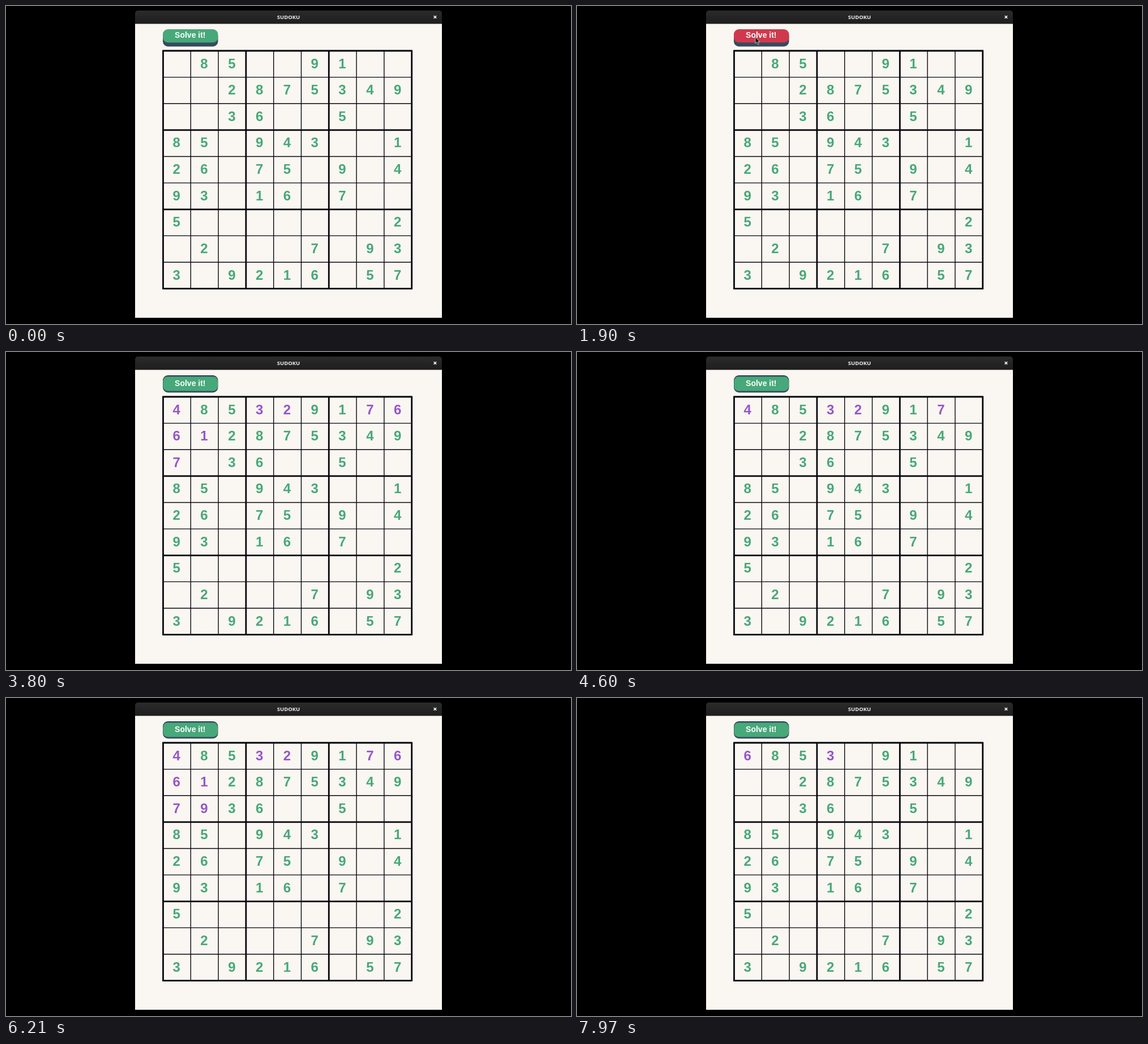
An HTML page with a canvas for the animation above (8 s loop, 998 by 561 pixels).

```html
<!DOCTYPE html>
<html lang="en">
<head>
<meta charset="utf-8">
<title>Sudoku solver</title>
<style>
  html, body { margin: 0; width: 100%; height: 100%; overflow: hidden; background: #000; }
  canvas { display: block; }
</style>
</head>
<body>
<canvas id="stage" width="998" height="561"></canvas>
<script>
const ctx = document.getElementById('stage').getContext('2d');
const LOOP = 8000;
const GREEN = '#47a879', RED = '#d0394d', PURPLE = '#9556c9', NAVY = '#354b5e', INK = '#05050c';
const GRID = { x: 277.5, y: 79, w: 48.8, h: 46.63 };

const PUZZLE = [
  '.85..91..', '..2875349', '..36..5..',
  '85.943..1', '26.75.9.4', '93.16.7..',
  '5.......2', '.2...7.93', '3.9216.57'
].join('');
const BLANKS = [...PUZZLE].flatMap((digit, i) => digit === '.' ? [i] : []);

// Solver steps: a digit fills the next blank cell, '-' clears the last one.
const STEPS = '4326-761-6179-------26-761-6179---------6327--';
const SOLVE_START = 2380, STEP_MS = 124;
const PRESS = 2250;

// Pointer path: time, x, y.
const PATH = [
  [580, 229, 165], [860, 308, 60], [1200, 308, 60],
  [1700, 315, 55], [2950, 315, 55], [3300, 326, -16]
];

function box(x, y, w, h, radius, fill) {
  ctx.fillStyle = fill;
  ctx.beginPath();
  ctx.roundRect(x, y, w, h, radius);
  ctx.fill();
}

function text(string, x, y, font, color) {
  ctx.font = font;
  ctx.fillStyle = color;
  ctx.textAlign = 'center';
  ctx.fillText(string, x, y);
}

function line(x1, y1, x2, y2, width) {
  ctx.lineWidth = width;
  ctx.beginPath();
  ctx.moveTo(x1, y1);
  ctx.lineTo(x2, y2);
  ctx.stroke();
}

function drawWindow() {
  ctx.fillStyle = '#000';
  ctx.fillRect(0, 0, 998, 561);
  const bar = ctx.createLinearGradient(0, 8, 0, 31);
  bar.addColorStop(0, '#2b2b2b');
  bar.addColorStop(1, '#1e1e1e');
  box(228, 8, 542, 24, [5, 5, 0, 0], bar);
  ctx.fillStyle = '#faf6f1';
  ctx.fillRect(228, 31.5, 542, 518.5);
  text('SUDOKU', 499, 22.6, 'bold 9.5px "Open Sans", sans-serif', '#eee');
  ctx.strokeStyle = '#fff';
  line(755.6, 17.2, 760.2, 21.8, 1.6);
  line(760.2, 17.2, 755.6, 21.8, 1.6);
}

function drawButton(pressed, hover) {
  if (pressed) {
    box(277, 41, 97.5, 30.5, 9, NAVY);
    box(277.5, 43.5, 96.5, 25.2, 8, GREEN);
  } else {
    box(277, 45, 97.5, 26.5, 9, NAVY);
    box(277, 41, 97.5, 23.5, 9, hover ? RED : GREEN);
  }
  text('Solve it!', 325.3, pressed ? 60.2 : 56.2, 'bold 14px "Liberation Sans", Arial, sans-serif', '#fff');
}

function drawGrid() {
  const { x, y, w, h } = GRID;
  ctx.strokeStyle = INK;
  for (let i = 0; i <= 9; i++) {
    const width = i % 3 ? 1.4 : 2.8;
    line(x + i * w, y - 1, x + i * w, y + 9 * h + 1, width);
    line(x - 1, y + i * h, x + 9 * w + 1, y + i * h, width);
  }
}

function drawDigit(digit, index, color) {
  const x = GRID.x + (index % 9 + 0.5) * GRID.w - 0.7;
  const y = GRID.y + Math.floor(index / 9) * GRID.h + 30.6;
  text(digit, x, y, 'bold 24px "Liberation Sans", Arial, sans-serif', color);
}

function solvedDigits(t) {
  const count = Math.max(0, Math.floor((t - SOLVE_START) / STEP_MS) + 1);
  const stack = [];
  for (const step of STEPS.slice(0, count)) {
    if (step === '-') stack.pop();
    else stack.push(step);
  }
  return stack;
}

function pointerAt(t) {
  const next = PATH.findIndex(point => point[0] > t);
  if (next < 1) return null;
  const [t0, x0, y0] = PATH[next - 1], [t1, x1, y1] = PATH[next];
  const u = (t - t0) / (t1 - t0), ease = u * u * (3 - 2 * u);
  return { x: x0 + (x1 - x0) * ease, y: y0 + (y1 - y0) * ease };
}

function drawPointer({ x, y }) {
  ctx.save();
  ctx.translate(x, y);
  const arrow = new Path2D('M0 0V11L2.6 8.7L4.5 13L6.4 12.2L4.5 8H8Z');
  ctx.fillStyle = '#151515';
  ctx.fill(arrow);
  ctx.strokeStyle = '#ddd';
  ctx.lineWidth = 0.8;
  ctx.stroke(arrow);
  ctx.restore();
}

function draw(t) {
  const pointer = pointerAt(t);
  const hover = pointer && pointer.x >= 277 && pointer.x <= 374 && pointer.y >= 41 && pointer.y <= 65;
  drawWindow();
  drawButton(t >= PRESS, hover);
  drawGrid();
  [...PUZZLE].forEach((digit, i) => { if (digit !== '.') drawDigit(digit, i, GREEN); });
  solvedDigits(t).forEach((digit, i) => drawDigit(digit, BLANKS[i], PURPLE));
  if (pointer) drawPointer(pointer);
}

const start = performance.now();
function tick() {
  draw((performance.now() - start) % LOOP);
  requestAnimationFrame(tick);
}
tick();
</script>
</body>
</html>
```
